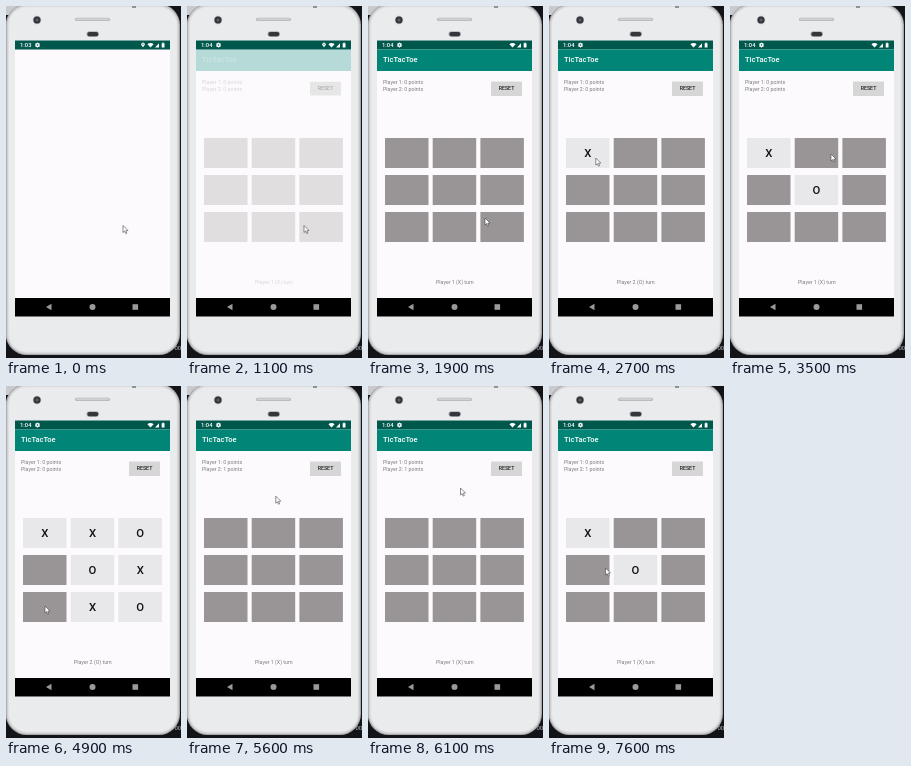
An HTML page with a canvas that plays this animation: 175 px wide and 352 px high, repeating every 8000 ms.

```html
<!DOCTYPE html>
<html lang="en">
<head>
<meta charset="utf-8">
<title>TicTacToe</title>
<style>
html, body { margin: 0; width: 100%; height: 100%; overflow: hidden; background: #121418; }
canvas { display: block; width: 175px; height: 352px; }
</style>
</head>
<body>
<canvas id="stage"></canvas>
<script>
const W = 175, H = 352, LOOP = 8000, STEP = 100;
const LAUNCH = 1000, RESTART = 5000;
const SCREEN = { x: 9, w: 155 };
const canvas = document.getElementById('stage');
const ctx = canvas.getContext('2d');
const scale = window.devicePixelRatio || 1;
canvas.width = W * scale;
canvas.height = H * scale;

const cellPos = i => [17 + (i % 3) * 47.7, 132 + Math.floor(i / 3) * 37];
const tap = (time, cell) => ({ time, cell });

// Each game is the order in which cells are tapped; X and O alternate.
const games = [
  [...'04125876'].map((c, i) => tap(i ? 2900 + 300 * i : 2600, +c)),
  [...'04'].map((c, i) => tap(7000 + 400 * i, +c))
];

// The cursor visits every tapped cell, plus a few free stops, keyed by time.
const stops = {};
for (const { time, cell } of games.flat()) {
  const [x, y] = cellPos(cell);
  stops[time] = [x + 22, y + 14];
}
Object.assign(stops, {
  0: [117, 219.5], 1800: [117, 219.5], 1900: [117, 212], 2400: [44, 148],
  3500: [101, 148], 6100: [92.5, 102], 7600: [56.5, 182]
});
const path = Object.entries(stops).map(([time, point]) => [+time, point]);

function rect(x, y, w, h, fill) {
  ctx.fillStyle = fill;
  ctx.fillRect(x, y, w, h);
}

function shape(points, fill) {
  ctx.beginPath();
  points.forEach(([x, y]) => ctx.lineTo(x, y));
  ctx.closePath();
  ctx.fillStyle = fill;
  ctx.fill();
}

function round(x, y, w, h, r, fill) {
  ctx.beginPath();
  ctx.roundRect(x, y, w, h, r);
  ctx.fillStyle = fill;
  ctx.fill();
}

function disc(x, y, r, fill) {
  ctx.beginPath();
  ctx.arc(x, y, r, 0, Math.PI * 2);
  ctx.fillStyle = fill;
  ctx.fill();
}

function label(text, x, y, size, fill, weight = 400, align = 'left') {
  ctx.font = `${weight} ${size}px Roboto, sans-serif`;
  ctx.textAlign = align;
  ctx.fillStyle = fill;
  ctx.fillText(text, x, y);
}

function drawPhone() {
  rect(0, 0, W, H, '#121418');
  rect(0, 0, W / 2, 9, '#c9cacd');
  label('00', 168.5, 343.5, 6, '#b9bbc0');

  const rims = ['#a9a8ab', '#cfcdd0', '#dfdfe1', '#eaebed'];
  rims.forEach((fill, i) => {
    const d = i * 1.1;
    round(d - 0.3, d - 2, 174.3 - 2 * d, 351 - 2 * d, 21 - d, fill);
  });

  rect(126, 0, 4, 2, '#8f9295');
  disc(31, 14, 4.2, '#b3b5b8');
  disc(31, 14, 3.5, '#32353a');
  disc(31, 14, 1.5, '#596069');
  round(69, 11.7, 35, 3.4, 1.7, '#b3b5b8');
  round(70, 12.3, 33, 2, 1, '#cfd1d3');
  round(80.5, 25.3, 12.5, 5.6, 2.8, '#aeb0b3');
  round(81.3, 25.9, 11, 4.4, 2.2, '#33363b');
}

function drawStatus(t) {
  rect(SCREEN.x, 34.5, SCREEN.w, 9, '#00574b');
  label(t < 500 ? '1:03' : '1:04', 14, 41, 5.8, '#fff', 500);

  for (let a = 0; a < 8; a++) {
    const turn = a * Math.PI / 4;
    disc(31.5 + 2 * Math.cos(turn), 39 + 2 * Math.sin(turn), 0.6, '#fff');
  }
  disc(31.5, 39, 2, '#fff');
  disc(31.5, 39, 0.8, '#00574b');

  if (t < LAUNCH + 200) {
    disc(137, 38.3, 1.7, '#fff');
    shape([[135.4, 38.8], [138.6, 38.8], [137, 41.6]], '#fff');
    disc(137, 38.2, 0.6, '#00574b');
  }

  ctx.beginPath();
  ctx.moveTo(144.5, 41.4);
  ctx.arc(144.5, 41.4, 4.4, -2.35, -0.79);
  ctx.closePath();
  ctx.fillStyle = '#fff';
  ctx.fill();
  shape([[149, 41.4], [153, 41.4], [153, 37.2]], '#fff');
  rect(155.7, 37.2, 2.8, 4.3, '#fff');
  rect(156.4, 36.6, 1.4, 0.8, '#fff');
}

function drawNav() {
  rect(SCREEN.x, 292, SCREEN.w, 18.5, '#000');
  shape([[40, 301], [45.5, 297.8], [45.5, 304.2]], '#9a9a9a');
  disc(86.5, 301, 3, '#9a9a9a');
  rect(126.5, 298.2, 5.6, 5.6, '#9a9a9a');
}

function drawApp(t) {
  const round2 = t > RESTART;
  const played = games[+round2].filter(m => m.time < t);
  const player = played.length % 2 ? '2 (O)' : '1 (X)';
  const grey = '#7c7c7c';

  rect(SCREEN.x, 43.5, SCREEN.w, 21.5, '#008577');
  label('TicTacToe', 15, 56, 7.54, '#fff', 500);
  label('Player 1: 0 points', 15, 78, 5.28, grey);
  label(`Player 2: ${+round2} points`, 15, 85.4, 5.28, grey);

  round(123, 76, 31, 13.8, 0.8, '#c9c8ca');
  round(123, 75.5, 31, 13.5, 0.8, '#d6d6d7');
  label('RESET', 138.5, 84.3, 5.28, '#222', 500, 'center');

  for (let i = 0; i < 9; i++) {
    const [x, y] = cellPos(i);
    const turn = played.findIndex(m => m.cell === i);
    round(x, y, 43.5, 30, 0.6, turn < 0 ? '#999495' : '#e8e7e9');
    if (turn >= 0) label('XO'[turn % 2], x + 21.8, y + 19.2, 11.3, '#111', 500, 'center');
  }
  label(`Player ${player} turn`, 86.8, 278.2, 5.28, grey, 400, 'center');
}

// Travels eagerly, then waits at the stop until its time has passed.
function cursorAt(t) {
  const next = path.findIndex(p => p[0] > t);
  if (next < 0) return path[path.length - 1][1];
  const [[t0, a], [t1, b]] = [path[next - 1], path[next]];
  const k = Math.min(1, (t - t0) / (t1 - t0) / 0.65);
  const e = k * k * (3 - 2 * k);
  return a.map((v, i) => v + (b[i] - v) * e);
}

function drawCursor(t) {
  const [x, y] = cursorAt(t);
  const arrow = [[0, 0], [0, 7], [1.6, 5.6], [2.7, 8.1], [3.8, 7.6], [2.8, 5.2], [5, 5]];
  shape(arrow.map(([dx, dy]) => [x + dx, y + dy]), '#fff');
  ctx.strokeStyle = '#444';
  ctx.lineWidth = 0.6;
  ctx.stroke();
}

function draw(t) {
  ctx.setTransform(scale, 0, 0, scale, 0, 0);
  drawPhone();
  rect(SCREEN.x, 34.5, SCREEN.w, 276, '#fcfafd');
  drawStatus(t);
  if (t >= LAUNCH) {
    ctx.globalAlpha = Math.min(1, ((t - LAUNCH + STEP) / 500) ** 1.4);
    drawApp(t);
    ctx.globalAlpha = 1;
  }
  drawNav();
  drawCursor(t);
}

const start = performance.now();
function tick() {
  const t = (performance.now() - start) % LOOP;
  draw(Math.floor(t / STEP) * STEP);
  requestAnimationFrame(tick);
}
tick();
</script>
</body>
</html>
```
